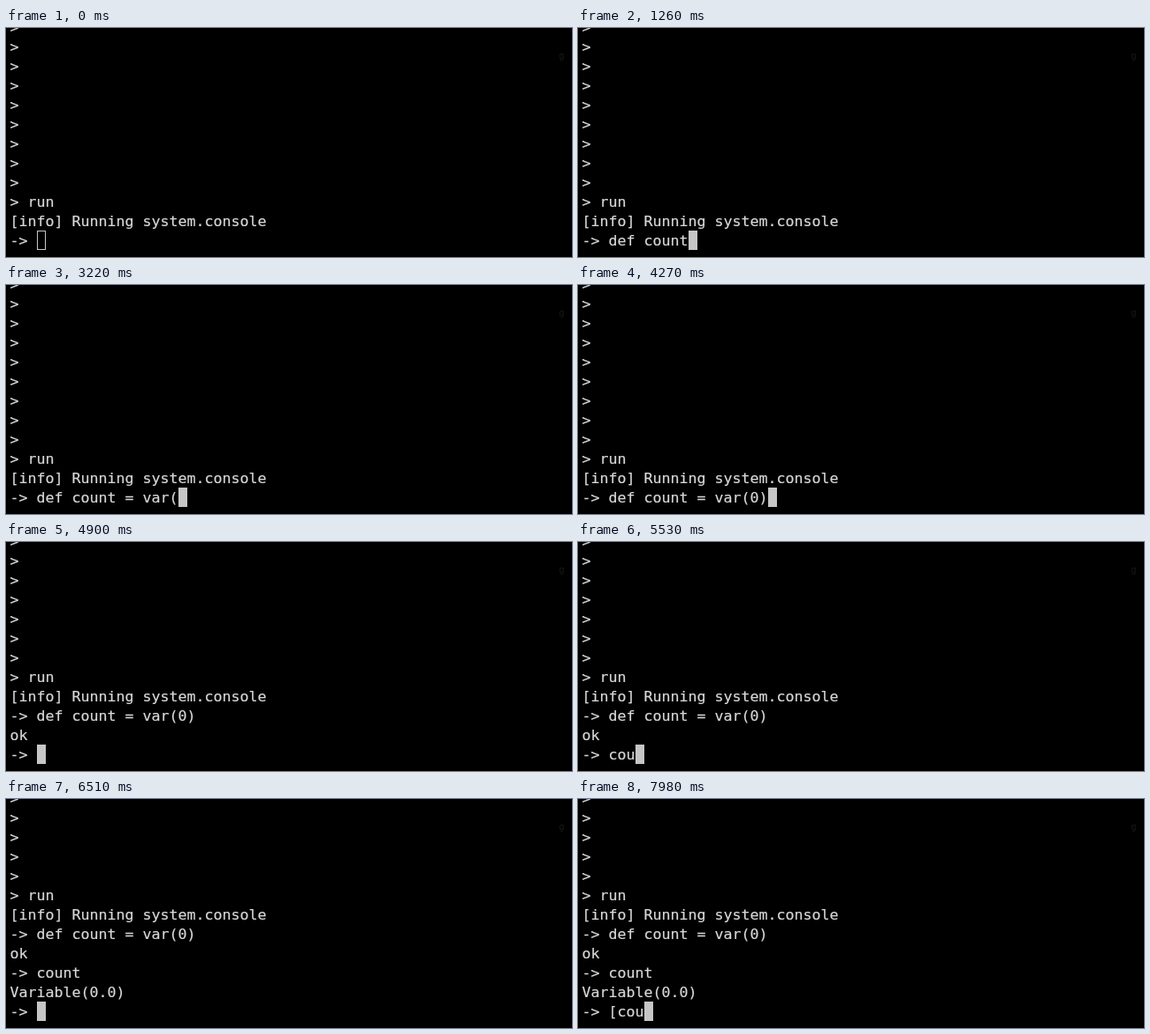
Recreate the animation shown at these times as an HTML page. Size 640 by 260 pixels, loop 8 s.

```html
<!DOCTYPE html>
<html lang="en">
<head>
<meta charset="utf-8">
<title>Console session</title>
<style>
  html, body { margin: 0; width: 100%; height: 100%; overflow: hidden; background: #000; }
  #stage { position: relative; width: 640px; height: 260px; overflow: hidden; background: #000; }
  #screen {
    position: absolute; left: 4.6px; bottom: 7px; margin: 0;
    font: 16.61px/22px "DejaVu Sans Mono", monospace;
    font-variant-ligatures: none; color: #d8d8d8; white-space: pre;
    -webkit-text-stroke: 0.2px #d8d8d8;
  }
  #cursor {
    position: absolute; top: 230px; width: 10px; height: 22px;
    box-sizing: border-box; border: 1px solid #c6c6c6; background: #c6c6c6;
  }
  #cursor.hollow { background: none; }
  #speck {
    position: absolute; left: 625px; top: 25px;
    font: 11px/14px "DejaVu Sans Mono", monospace; color: #181818;
  }
</style>
</head>
<body>
<div id="stage">
  <pre id="screen"></pre>
  <div id="cursor"></div>
  <div id="speck">g</div>
</div>
<script>
const LOOP = 8000, ROWS = 12, CELL = 10, LEFT = 5, PROMPT = "-> ";
const screen = document.getElementById("screen");
const cursor = document.getElementById("cursor");

// Each entry starts at a time, prints a result, then types text in timed chunks.
const commands = [
  { start: 0, output: [], keys: [
    [350, "d"], [420, "e"], [630, "f"], [700, " "], [1260, "count"], [1540, " "],
    [1680, "="], [1820, " "], [2450, "v"], [2660, "a"], [2730, "r"],
    [3080, "("], [3990, "0"], [4130, ")"]] },
  { start: 4900, output: ["ok"], keys: [
    [5320, "c"], [5390, "o"], [5530, "u"], [5670, "n"], [5740, "t"], [5810, " "]] },
  { start: 6510, output: ["Variable(0.0)"], keys: [
    [7350, "["], [7630, "c"], [7700, "o"], [7840, "u"]] }
];
const history = [...Array(9).fill(">"), "> run", "[info] Running system.console"];

function linesAt(time) {
  const lines = [...history];
  for (const { start, output, keys } of commands) {
    if (time < start) break;
    const typed = keys.filter(([at]) => at <= time).map(([, text]) => text).join("");
    lines.push(...output, PROMPT + typed);
  }
  return lines.slice(-ROWS);
}

let shown = null;
function draw() {
  const time = performance.now() % LOOP;
  const lines = linesAt(time);
  const text = lines.join("\n");
  if (text !== shown) {
    shown = screen.textContent = text;
    cursor.style.left = LEFT + CELL * lines.at(-1).length + "px";
    cursor.className = time < 350 ? "hollow" : "";
  }
  requestAnimationFrame(draw);
}
draw();
</script>
</body>
</html>
```
